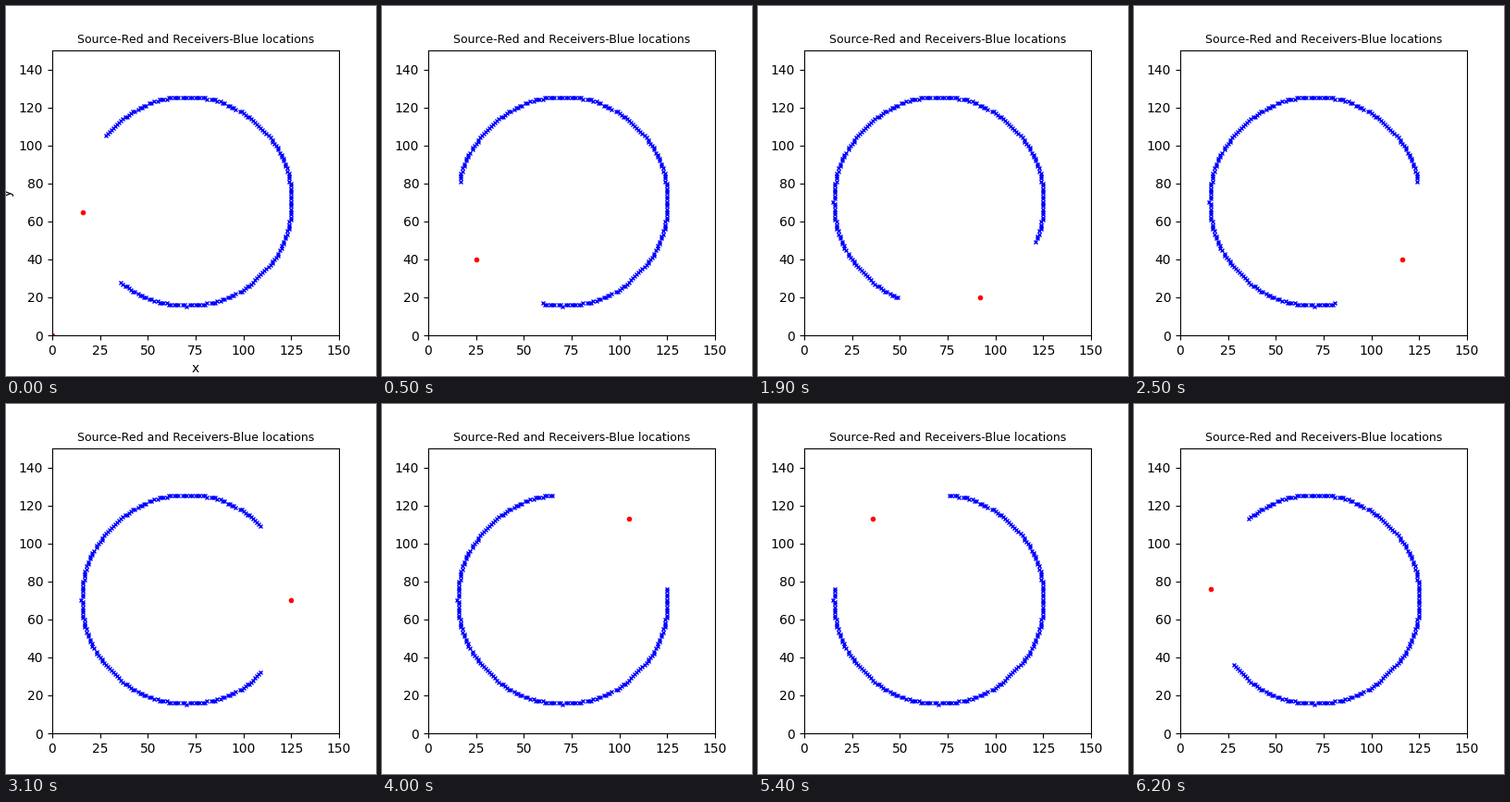
Write a matplotlib script that moves like this. It is 400 px wide and 400 px high and loops after 6.3 s.

```python
import numpy as np
import matplotlib.pyplot as plt
from matplotlib.animation import FuncAnimation

FRAMES = 63
INTERVAL = 100
CENTRE, RADIUS = 70, 55
SLOTS = 256       # receiver positions on the full circle
STEP = 4          # slots the emitter advances per frame
GAP = SLOTS // 8  # silent slots on each side of the emitter


def grid_point(slot):
    """Circle position moved up to the next whole grid cell."""
    angle = 2 * np.pi * np.asarray(slot) / SLOTS
    xy = CENTRE + RADIUS * np.array([np.cos(angle), np.sin(angle)])
    return np.ceil(np.round(xy, 9))


slots = np.arange(SLOTS)
ring = grid_point(slots)

fig, ax = plt.subplots(figsize=(4, 4), dpi=100)
ax.set_xlim(0, 150)
ax.set_ylim(0, 150)
ax.set_title("Source-Red and Receivers-Blue locations", fontsize=9)

receivers, = ax.plot([], [], "x", color="#0000ff", markersize=3)
emitter, = ax.plot([], [], "o", color="#ff0000", markersize=3)
corner, = ax.plot([0], [0], "o", color="#ff0000", markersize=3)
opening = [corner, ax.set_xlabel("x"), ax.set_ylabel("y")]


def draw(frame):
    slot = STEP * (frame - FRAMES // 2)
    offset = (slots - slot) % SLOTS
    heard = np.minimum(offset, SLOTS - offset) >= GAP
    receivers.set_data(*ring[:, heard])
    x, y = grid_point(slot)
    emitter.set_data([x], [y])
    # The labels and the corner dot show only when the loop starts.
    for artist in opening:
        artist.set_visible(frame == 0)
    return [receivers, emitter, *opening]


anim = FuncAnimation(fig, draw, frames=FRAMES, interval=INTERVAL,
                     init_func=lambda: draw(0), repeat=True, blit=False)
plt.show()
```
